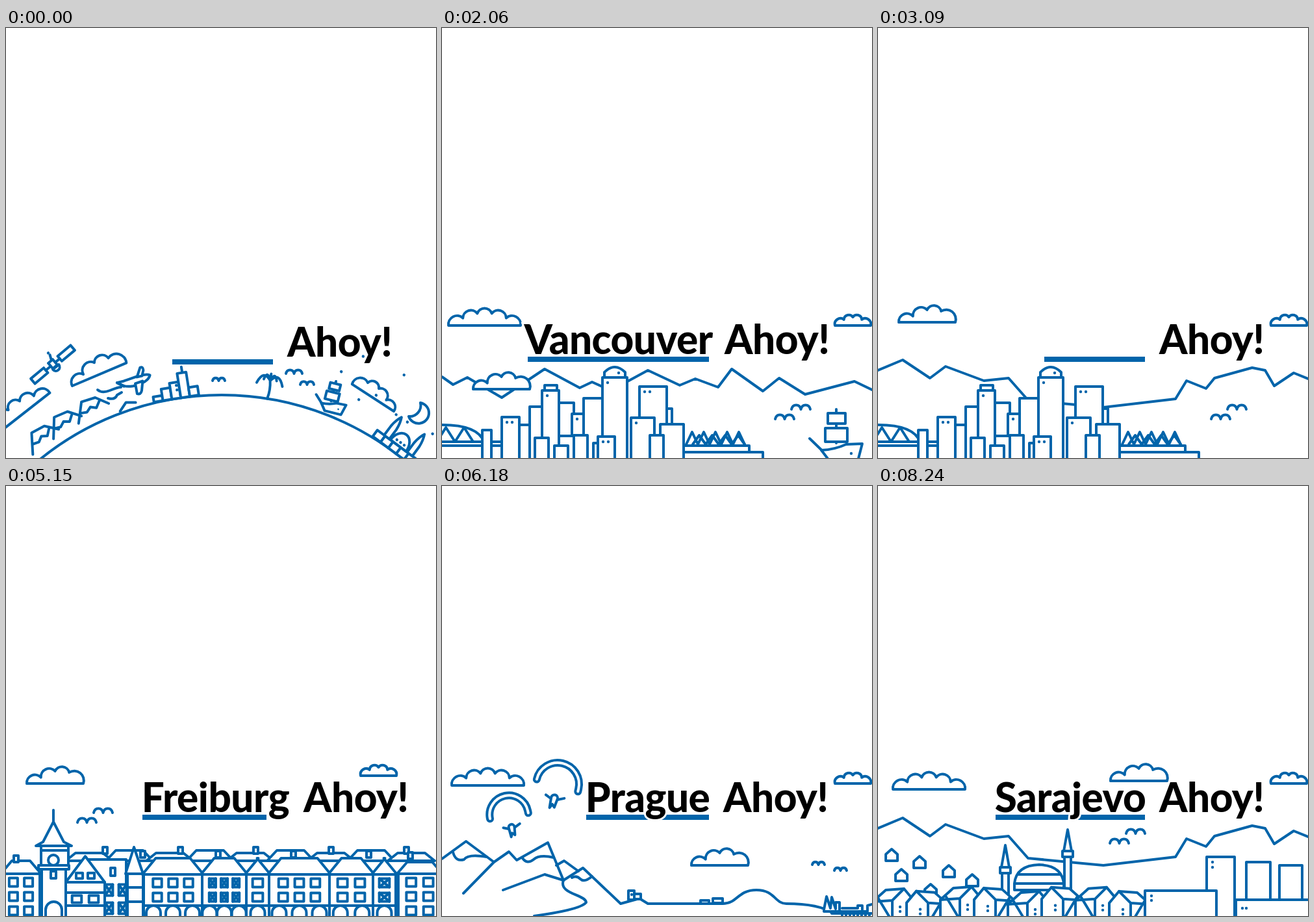
Animation of 662x662 px, one loop 9.27 s. Source, as an HTML page:

```html
<!DOCTYPE html>
<html lang="en">
<head>
<meta charset="utf-8">
<title>Ahoy!</title>
<style>
  html, body { margin: 0; width: 100%; height: 100%; overflow: hidden; background: #fff; }
  svg { display: block; width: 100%; height: 100%; }
  .art { fill: #fff; stroke: #0064aa; stroke-width: 4; stroke-linecap: round; stroke-linejoin: round; }
  .art * { vector-effect: non-scaling-stroke; }
  .line { fill: none; }
  .dot { fill: #0064aa; stroke: none; }
  .bar { stroke: #0064aa; stroke-width: 8; }
  text { font: 800 62px Lato, "Open Sans", sans-serif; letter-spacing: -0.5px; }
  .name { text-anchor: middle; stroke: #fff; stroke-width: 6px; paint-order: stroke; }
</style>
</head>
<body>
<svg id="stage" viewBox="0 0 662 662"></svg>
<script>
const STEP = 1030;
const FLOOR = 666; // just below the stage

// Marks
const shape = d => `<path d="${d}"/>`;
const line = d => `<path class="line" d="${d}"/>`;
const box = (x, y, w, h = FLOOR - y) => shape(`M${x} ${y}h${w}v${h}h${-w}z`);
const dot = (x, y) => `<circle class="dot" cx="${x}" cy="${y}" r="2.2"/>`;
const at = (x, y, art, turn = 0, sx = 1, sy = Math.abs(sx)) =>
  `<g transform="translate(${x} ${y}) rotate(${turn}) scale(${sx} ${sy})">${art}</g>`;
const times = (n, f) => Array.from({ length: n }, (_, i) => f(i)).join('');
const zigzag = (x, y, step, rise, n) => line(`M${x} ${y}` + times(n, () => `l${step} ${-rise} ${step} ${rise}`));

// Puffs sit on a half wave; skew moves the crown to the right
function cloud(x, y, w, h, n, skew = 1) {
  let d = 'M0 0', px = 0, py = 0;
  for (let i = 1; i <= n; i++) {
    const t = i / n, cx = w * t, cy = -h * 0.65 * Math.sin(Math.PI * t ** skew);
    const r = Math.hypot(cx - px, cy - py) * 0.53;
    d += `A${r} ${r} 0 0 1 ${cx} ${cy}`;
    [px, py] = [cx, cy];
  }
  return at(x, y, shape(d + 'Z'));
}
const longCloud = (x, y) => cloud(x, y, 111, 30, 5);
const pointCloud = (x, y) => cloud(x, y, 87, 31, 4, 1.35);
const smallCloud = (x = 605, y = 458) => cloud(x, y, 55, 20, 4);

const bird = (x, y, w = 29) =>
  at(x, y + 2, line('M0 0C2-9 13-9 15 0C17-9 28-9 30 0'), 0, w / 30);
const birds = (x, y) => bird(x, y) + bird(x + 25, y - 15);

// Buildings
const panes = (x, y, w, h, cols, rows, draw = box) => {
  const dx = w / cols, dy = h / rows;
  return times(rows, r => times(cols, c => draw(x + dx * (c + 0.22), y + dy * (r + 0.2), dx * 0.56, dy * 0.6)));
};
const cross = (x, y, w, h) => box(x, y, w, h) + line(`M${x} ${y}l${w} ${h}M${x + w} ${y}l${-w} ${h}`);
const roof = (x, y, w, h, inset) => shape(`M${x} ${y}l${inset} ${-h}h${w - 2 * inset}l${inset} ${h}Z`);
const arch = (x, y, w) => shape(`M${x} ${FLOOR}V${y + w / 2}a${w / 2} ${w / 2} 0 0 1 ${w} 0V${FLOOR}`);
const house = (x, y, w, h, rise, cols, rows, draw) =>
  box(x, y, w, h) + roof(x - 2, y, w + 4, rise, rise * 0.7 + 3) + panes(x + w * 0.1, y + 2, w * 0.8, h - 4, cols, rows, draw);
const hut = (x, y, w = 18, h = 18) => shape(`M${x} ${y + h}v${-h * 0.55}l${w / 2} ${-h * 0.45} ${w / 2} ${h * 0.45}v${h * 0.55}Z`);
const tower = (x, y, w, lamps = 1) => box(x, y, w) + times(lamps, i => dot(x + 8 + i * 8, y + 8));

// Trees
function tree(x, y, r, n = 6) {
  const point = i => {
    const a = (i / n) * 2 * Math.PI + 0.5;
    return `${x + r * 0.82 * Math.cos(a)} ${y + r * 0.82 * Math.sin(a)}`;
  };
  return line(`M${x} ${y + r}v10`) + shape(`M${point(0)}` + times(n, i => `A${r * 0.45} ${r * 0.45} 0 0 1 ${point(i + 1)}`) + 'Z');
}
const pine = (x, y, w, h) => line(`M${x} ${y + h * 0.8}v${h * 0.2}`) +
  times(3, i => {
    const k = 3 - i, half = w * (0.2 + 0.1 * k), top = y + h * 0.14 * (k - 1);
    return shape(`M${x} ${top}L${x + half} ${y + h * 0.28 * k}H${x - half}Z`);
  });

// Ship with its mast top at the origin
const ship = line('M0 0V52M-41 45L-10 75') + box(-13, 6, 27, 16) + box(-17, 29, 34, 21) +
  shape('M-23 63Q-2 62 15 54L40 53 33 80H-10Z') + dot(23, 68);

// Globe: parts stand on the curve at an angle and height
const R = 444, CX = 332, CY = 1009;
const on = (deg, h, art) => `<g transform="rotate(${deg} ${CX} ${CY}) translate(${CX} ${CY - R - h})">${art}</g>`;
const peak = line('M-28 -12L-10 -40 12 -37 27 -20M-19 -25L-9 -22 -1 -27 7 -22 17 -31');
const skyline = line('M14 -38V-47') + [8, 18, 25, 38, 14].map((h, i) => box(-36 + i * 14, -h, 14, h)).join('') + dot(2, -20) + dot(2, -13);
const palm = line('M0 0Q3 -14 0 -28' + times(5, i => {
  const x = (i - 2) * 10;
  return `M0 -28Q${x * 0.6} -44 ${x} ${-36 + Math.abs(x) * 0.7}`;
}));
const spire = x => shape(`M${x - 5} -12V-30Q${x - 4} -42 ${x} -50Q${x + 4} -42 ${x + 5} -30V-12Z`);
const domes = times(5, i => box(-40 + i * 15, -12, 15, 12)) + shape('M-15 -12A15 21 0 0 1 15 -12Z') +
  spire(-22) + spire(22) + times(3, i => dot(-7 + i * 7, -18));
const satellite = box(14, -5, 26, 10) + box(-40, -5, 26, 10) + line('M-14 0H14M2 -5L6 -14') + box(-4, -6, 9, 11) +
  shape('M-5 6a6 6 0 0 0 12 0z') + dot(6, -18);
const plane = line('M-29 -4L-20 4') + shape('M-29 -4H-18L-8 -5Q18 -8 23 -3Q18 7 -6 7Q-16 6 -20 3Z') +
  shape('M3 -5L11 -18Q16 -19 15 -13L11 -5Z') + shape('M-2 4L-3 20Q2 23 5 17L10 3Z');

const globe =
  at(-20, 630, longCloud(0, 0), -38) + at(102, 551, pointCloud(0, 0), -23, 1.04) + at(597, 590, pointCloud(0, 0), 33, -0.88) +
  [-36, -31, -25.3].map(deg => on(deg, 0, peak)).join('') + on(-18.8, 0, line('M-13 -3L0 -13 14 -8')) +
  `<circle class="line" cx="${CX}" cy="${CY}" r="${R}"/>` +
  at(72, 518, satellite, -40) + at(200, 543, plane, -14) + line('M141 557Q148 563 160 558T177 553M157 570Q168 573 171 565L178 561') +
  on(-8.9, 0, skyline) + on(9.1, 0, palm) + bird(318, 541, 19) + bird(431, 530, 25) + bird(453, 547, 21) +
  at(508, 544, ship, 14, 0.6) + on(36.6, 0, domes) +
  shape('M638 577A16 16 0 1 1 620 598A17 17 0 0 0 638 577Z') +
  times(9, i => on(21 + 2.4 * i, 70 + 38 * Math.sin(i * 2), dot(0, 0)));

// Harbour city
const ridge = line('M0 537L17 549 39 538 92 569 158 525 212 554 231 545 260 558 317 527 366 550 390 540 425 553 446 525 494 559 519 539 559 564 635 544 662 557');
const towers =
  line('M0 611Q56 611 65 638M0 637H135M0 643H135') + zigzag(-8, 637, 14, 22, 2) + box(62, 619, 14) +
  box(119, 611, 20) + box(135, 583, 22) + box(180, 577, 23) + tower(92, 599, 27, 2) + tower(200, 594, 18) +
  box(158, 550, 19) + tower(154, 558, 26) + box(218, 570, 36) +
  shape('M250 540V530Q266 514 282 530V540') + dot(272, 531) + tower(247, 538, 38) +
  box(341, 586, 13) + tower(304, 552, 42, 2) + tower(291, 600, 36) + box(336, 610, 36) + box(320, 627, 21) +
  box(180, 628, 37) + times(4, i => box(143 + i * 30, 631 + (i % 2) * 14 - i * 2, 21)) + tower(240, 629, 26, 2);
const pier = zigzag(376, 641, 9, 19, 5) + zigzag(386, 641, 10, 14, 4) + line('M374 643H473V653M374 653H494V664');

// Coast
const sailboat = line('M0 632H50M93 632H118M72 582V622') + shape('M72 587L56 616H90Z') + line('M72 587V616') + shape('M48 623H96L88 636H57Z');
const cliffs = line('M165 576L147 582 130 600 133 614 120 624 116 639 246 633 275 644 320 640 361 654 442 645 522 662') +
  line('M140 598L151 607 134 622 162 628M178 636L185 626 222 617 248 576M193 578L200 598H210L231 578M222 617L225 633') +
  line('M281 571L271 613 256 632 266 642M271 613L315 591 335 574M320 640L331 613 348 611 385 570M361 654L389 594 377 583') +
  line('M442 646L449 596 502 566M595 558L611 598 595 616 601 622 562 662') +
  line('M165 576H260L340 574 385 569 483 558 503 567H552L595 558 633 570H662');
const castle = shape('M180 540V526H187V531H197V526H204V540') + line('M238 493V514') + box(231, 515, 20, 25) + box(238, 525, 6, 7) +
  box(256, 526, 29, 45) + box(270, 545, 7, 13) + box(170, 548, 90, 28) + roof(165, 548, 99, 9, 6) + panes(173, 550, 86, 22, 8, 1);
const village = tree(303, 551, 13) + house(318, 546, 50, 26, 6, 4, 2) + tree(381, 540, 17) + house(402, 534, 52, 30, 8, 3, 2) +
  pine(470, 515, 30, 42) + house(506, 547, 40, 20, 6, 3, 1) + tree(558, 544, 14) + pine(594, 531, 21, 27) + tree(625, 537, 20, 7) + tree(652, 546, 14);

// Old market square: [width, window columns, timbered]
const plots = [[90, 3], [68, 3, true], [35, 1], [93, 3], [67, 2], [35, 1, true]];
function square() {
  let x = 212;
  return plots.map(([w, cols, timber]) => {
    const art = box(x, 597, w) + house(x, 598, w, 48, 25, cols, 2, timber && cross) +
      times(cols, i => arch(x + w * (i + 0.5) / cols - 11, 646, 22));
    x += w;
    return art;
  }).join('');
}
const gate = line('M73 499V518') + box(54, 554, 42, 35) + shape('M73 517L89 548 101 554H46L57 548Z') + line('M54 561H96') +
  box(50, 584, 47, 6) + box(55, 590, 37) + '<circle cx="73" cy="576" r="8"/>' + box(69, 593, 8, 11) + arch(61, 640, 25);
const gable = shape(`M92 ${FLOOR}V610L122 570 152 610V${FLOOR}Z`) + line('M92 610H152M92 626H152M92 646H152') +
  panes(104, 593, 36, 14, 2, 1) + panes(96, 627, 52, 18, 2, 1);
const roofs =
  times(9, i => roof(92 + i * 62, 577, 72, 12 + 4 * (i % 2), 15) + box(149 + i * 58, 556 + 6 * (i % 2), 7, 10)) +
  house(-6, 597, 58, 70, 20, 2, 3) + box(12, 569, 7, 10) +
  box(127, 575, 58) + box(161, 588, 7, 12) + panes(148, 608, 42, 56, 2, 2, cross) + gable + gate +
  box(187, 597, 24) + shape('M197 556L184 597H211Z') + line('M187 618H210M187 640H210') +
  square() + house(604, 597, 66, 70, 18, 2, 3) + box(619, 564, 7, 10);

// Alpine valley
const wing = 'M-33 0A33 33 0 0 1 33 0v4';
const glider = `<path class="line" d="${wing}" style="stroke-width:12"/><path class="line" d="${wing}" style="stroke:#fff"/>` +
  at(0, 26, line('M-14 -6L-5 -2M4 -2L15 -7') + shape('M-5 -4A5 5 0 0 1 5 -4L3 10 -1 6 -4 12Z'));
const gliders = at(178, 459, glider, 13) + at(103, 506, glider, -12, 0.9);
const alps = line('M0 574L37 547 80 579 103 563 115 576 163 549 187 607M33 627L80 579M94 622L158 598 187 607') +
  line('M17 564Q21 579 34 575Q40 566 69 571M124 573Q131 583 141 575Q150 567 172 572M200 603Q207 599 213 605T231 601') +
  line('M176 584L188 577 210 593M187 607L217 588 275 643 304 635 317 643H432C455 643 455 622 484 622S512 643 530 643C566 643 588 648 602 658') +
  line('M187 607C179 628 221 629 222 641Q214 652 142 662') +
  box(287, 623, 9, 14) + box(296, 628, 10, 8) + dot(292, 629) + box(398, 638, 13, 5) + box(417, 635, 15, 7);
const fort = shape('M588 652L592 632 598 650 600 633 606 651V641H612V655H588Z') +
  line('M611 655H655V646L662 644M616 650H640V646H647V655M600 658H662') + times(8, i => line(`M${616 + i * 6} 658v4`));

// Valley with minarets
const hills = line('M0 527L38 511 80 539 104 521 163 543 201 539 231 573 347 584 458 571 475 543 505 555 518 539 576 523 596 527 610 551 640 531 662 540');
const minaret = (x, y, h) => box(x - 5, y + h, 10, 80) + shape(`M${x} ${y}l-6 ${h}h12Z`) + box(x - 8, y + h, 16, 9);
const mosque = minaret(196, 553, 34) + shape('M210 622V612Q213 584 248 583Q283 584 286 612V622Z') + line('M216 598H281M211 612H286') + minaret(292, 529, 33);
const huts = [[12, 559], [55, 570], [27, 590], [100, 584], [136, 598], [72, 613]].map(([x, y]) => hut(x, y)).join('');
const oldTown = times(8, i => {
  const y = 622 + 4 * Math.sin(i * 2);
  return at(i % 2 ? 55 + i * 52 : -8 + i * 52, y, shape('M0 18L20 0 48 -2 63 16V50H0Z') + line('M0 18L30 16 48 -2M30 16V50M8 12L26 42') + dot(42, 26) + dot(42, 33), 0, i % 2 ? -1 : 1);
});
const blocks = box(506, 571, 43) + dot(515, 579) + dot(515, 587) + box(567, 579, 37) + box(618, 584, 35) +
  box(551, 637, 116) + dot(561, 650) + dot(567, 650) + box(411, 623, 110) + dot(421, 631) + dot(421, 638);

// A scene: drawing, underline and wording
function scene(art, { name = '', from = 256, to = 411, end = to, x = 433, y = 502 } = {}) {
  return `<g class="art">${art}</g><path class="bar" d="M${from} ${y + 8}H${end}"/>` +
    `<text class="name" x="${(from + to) / 2}" y="${y}">${name}</text><text x="${x}" y="${y}">Ahoy!</text>`;
}

const harbour = towers + pier + birds(513, 600);
const scenes = [
  scene(globe, { y: 506 }),
  scene(longCloud(10, 467) + smallCloud() + ridge + huts + oldTown + blocks),
  scene(longCloud(10, 458) + smallCloud() + ridge + pointCloud(48, 556) + harbour + at(607, 587, ship), { name: 'Vancouver', from: 132, x: 435 }),
  scene(pointCloud(32, 453) + smallCloud() + hills + harbour),
  scene(pointCloud(32, 458) + birds(154, 491) + sailboat + cliffs + castle + village, { name: 'Duino', from: 260 }),
  scene(pointCloud(32, 458) + smallCloud(546, 446) + birds(110, 516) + roofs, { name: 'Freiburg', from: 210, to: 435, end: 401, x: 458 }),
  scene(longCloud(15, 461) + smallCloud() + pointCloud(384, 584) + bird(570, 581, 19) + bird(604, 590, 19) + gliders + alps + fort, { name: 'Prague', from: 222 }),
  scene(pointCloud(32, 458) + smallCloud() + birds(110, 516) + ridge + roofs),
  scene(longCloud(23, 467) + pointCloud(358, 454) + smallCloud() + birds(357, 548) + hills + huts + mosque + oldTown + blocks, { name: 'Sarajevo', from: 181 })
];

const stage = document.getElementById('stage');
stage.innerHTML = scenes.map(s => `<g visibility="hidden">${s}</g>`).join('');
const layers = [...stage.children];
const start = performance.now();

function show() {
  const now = Math.floor((performance.now() - start) / STEP) % layers.length;
  layers.forEach((g, i) => g.setAttribute('visibility', i === now ? 'visible' : 'hidden'));
  requestAnimationFrame(show);
}
show();
</script>
</body>
</html>
```
